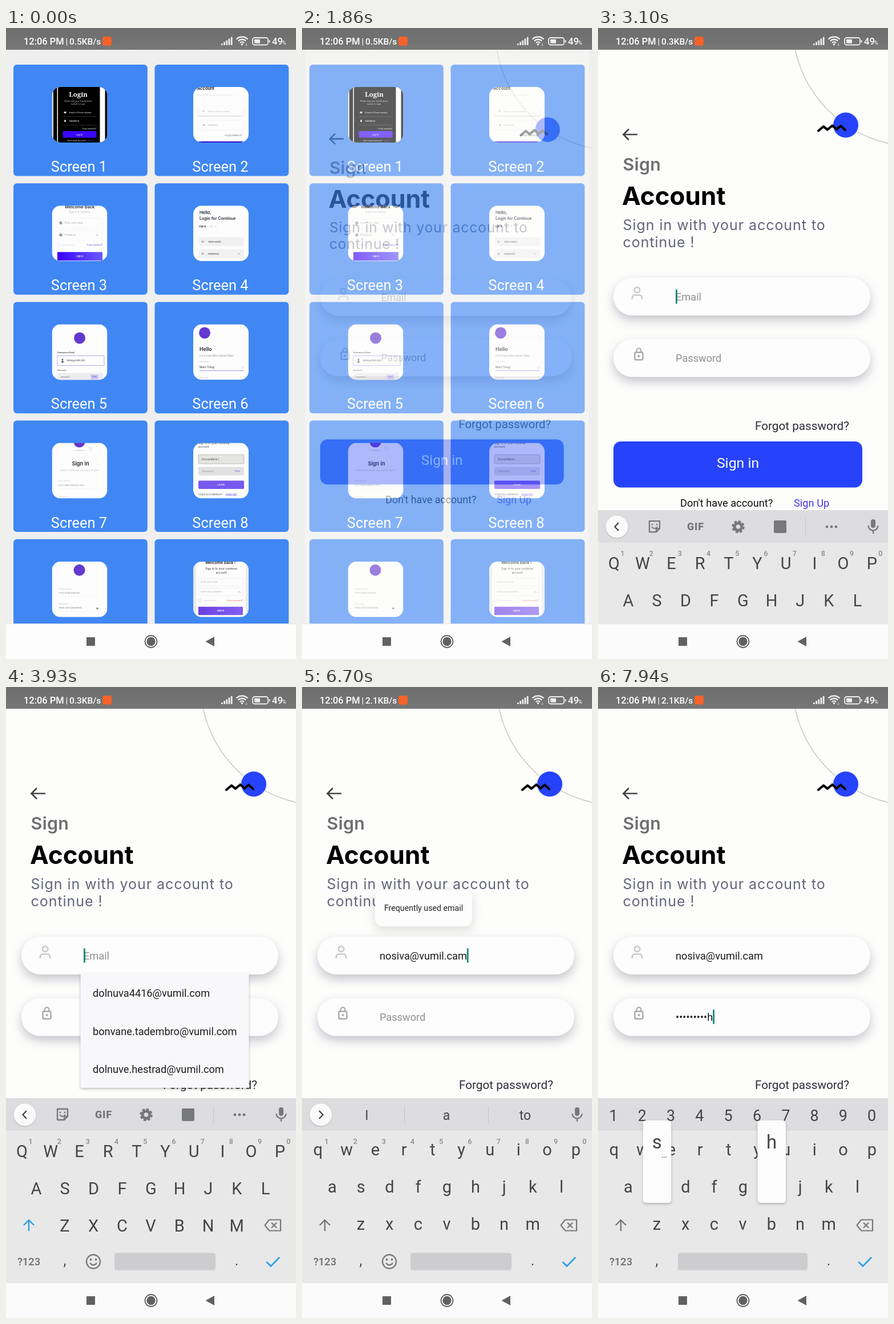
An HTML page that plays this animation: 508x1102 px, repeating every 7.99 s.

```html
<!DOCTYPE html>
<html lang="en">
<head>
<meta charset="utf-8">
<title>Sign in screen</title>
<style>
html, body { margin: 0; width: 100%; height: 100%; overflow: hidden; background: #fdfdfc; }
svg { display: block; width: 100vw; height: 100vh; font-family: Roboto, sans-serif; }
text { white-space: pre; }
.m { text-anchor: middle; }
.e { text-anchor: end; }
.md { font-weight: 500; }
.w { font-family: Inter, sans-serif; }
.b { font-family: Inter, sans-serif; font-weight: 600; }
.pill { filter: drop-shadow(0 8px 9px rgba(50, 45, 70, .27)); }
.pop { filter: drop-shadow(0 2px 2px rgba(0, 0, 0, .25)); }
.tip { filter: drop-shadow(0 5px 9px rgba(0, 0, 0, .14)); }
.soft { filter: drop-shadow(0 1px 1px rgba(0, 0, 0, .2)); }
</style>
</head>
<body>
<svg id="stage" viewBox="0 0 508 1102" preserveAspectRatio="none"></svg>
<script>
const LOOP = 7990, OPEN = 1760, FOCUS = 2900, PICK = 5690, PASS = 7020;
const KEY_TIMES = [4150, 4480, 4800, 5100];
const NAME = 'Nosi', EMAIL = 'nosiva@vumil.cam', MASH = 'sdhjsghdsh';
const MASH_START = 7140, MASH_STEP = 85, POP = 165;
const ROWS = ['qwertyuiop', 'asdfghjkl', 'zxcvbnm'], ROW_X = [28, 53, 103], STEP = 50.2;
const ROW_Y = [818, 883, 948];

const tx = (x, y, size, str, fill = '#fff', cls = '', more = '') =>
  `<text x="${x}" y="${y}" font-size="${size}" fill="${fill}" class="${cls}" ${more}>${str}</text>`;
const rc = (x, y, w, h, fill, r = 0, more = '') =>
  `<rect x="${x}" y="${y}" width="${w}" height="${h}" rx="${r}" fill="${fill}" ${more}/>`;
const ci = (x, y, r, fill, more = '') => `<circle cx="${x}" cy="${y}" r="${r}" fill="${fill}" ${more}/>`;
const ln = (d, color, w = 2, more = '') =>
  `<path d="${d}" fill="none" stroke="${color}" stroke-width="${w}" ${more}/>`;
const gp = (id, body, more = '') => `<g id="${id}" ${more}>${body}</g>`;
const round = 'stroke-linecap="round" stroke-linejoin="round"';
const edge = c => `stroke="${c}" stroke-width=".6"`;

const DARK = '#222633', PALE = '#b4b4b8', VIOLET = '#5b3de0';
const logo = (x, y) => ci(x, y, 10, '#6338cf');
const hint = (x, y, str, fill = PALE, size = 4.2, cls = 'w') => tx(x, y, size, str, fill, cls);

// Thumbnails, 97 x 97 each
const thumbs = [
  rc(0, 0, 97, 97, '#000') + rc(0, 0, 2.5, 97, '#ddd') + rc(9, 0, 1.5, 97, '#fff') + rc(84, 0, 9, 97, '#fff') +
  tx(46, 17, 11.5, 'Login', '#fff', 'm', 'font-family="Noto Serif, serif" font-weight="700"') +
  hint(46, 26, 'Please enter your email &amp; phone', '#ddd', 3.2, 'w m') + hint(46, 31, 'number to Login.', '#ddd', 3.2, 'w m') +
  rc(21, 43, 4, 3, '#ccc') + hint(30, 46, 'Email or Phone number', '#fff', 3.6) + rc(19, 51, 58, .5, '#555') +
  rc(21.5, 57.5, 3, 3.5, '#ccc') + hint(30, 61, 'Password', '#fff', 3.8) + rc(19, 66, 58, .5, '#555') +
  hint(78, 73.5, 'Forgot password?', '#fff', 3, 'w e') + rc(19, 77, 59, 11.5, '#3a08fa', 2) +
  hint(48, 84.5, 'Log in', '#fff', 4, 'w m') + hint(27, 94.5, "Don't have account?", '#fff', 3.4) + hint(62, 94.5, 'Sign Up', '#5b35ff', 3),

  tx(7, 5, 7.4, 'Account', '#111', 'b') + hint(7, 15, 'Sign in with your account to continue !', '#d2d2d5', 3.5) +
  rc(9, 34, 80, 16, '#fdfdfc', 3, 'class="soft"') + ci(18, 42, 1.3, 'none', edge('#999')) + hint(26, 43.5, 'Email or phone number', PALE, 3.5) +
  rc(9, 58, 80, 17, '#fdfdfd', 3, 'stroke="#f1f1f4"') + rc(17, 65, 3, 3, '#bbb') + hint(26, 68, 'Password', PALE, 3.7) +
  hint(86, 86, 'Forgot password?', '#777', 3.7, 'w e') + rc(9, 95, 78, 4, '#3a12cc', 1),

  tx(48.5, 5, 7.3, 'Welcome Back', DARK, 'b m') + hint(48.5, 12.5, 'Sign in to continue', PALE, 4.2, 'w m') +
  [22, 43].map((y, i) => rc(9.5, y, 79, 17, '#fdfdfd', 2, edge('#eeeef1')) + rc(13, y + 6, 5, 4.5, '#999') +
    hint(22, y + 10, i ? 'Password' : 'Enter your email', '#aaa', 4.2)).join('') +
  ln('M77 49l4 4M77 52q2-3 4 0', '#aaa', .6) + rc(9.5, 66, 5, 5, 'none', .5, edge('#ddd')) +
  hint(18, 70, 'Remember me', '#ccc', 3.2) + hint(88.5, 70, 'Forgot password?', VIOLET, 3.2, 'w e') +
  rc(9.5, 81, 79, 15, 'url(#btn)', 1) + hint(49, 90, 'Sign In', '#fff', 3.7, 'b m'),

  tx(11, 15, 7.4, 'Hello,', DARK, 'b') + tx(11, 24.5, 7.1, 'Login for Continue', DARK, 'b') +
  hint(10, 38, 'Sign in', DARK, 3.8, 'b') + hint(25, 38, '/ Sign up', '#c5c5c9', 3.8) +
  [55, 76].map((y, i) => rc(10, y, 79, 15.5, '#f1f1f2', 2) + ci(16.5, y + 8, 2, '#b5b5b9') +
    hint(26, y + 9.5, i ? 'Password' : 'Tarvo Menil', '#333', 4.1)).join('') + ln('M78 82l4 4M78 85q2-3 4 0', '#aaa', .6),

  logo(48.5, 24) + hint(9.5, 51, 'Username or Email', '#333', 3.3, 'b') +
  rc(9.5, 55, 82, 17, '#fdfdff', 1, edge('#7d73e8')) + ci(18.5, 61.5, 1.5, '#666') + ci(18.5, 65.5, 2, '#666') +
  hint(26, 64.5, 'tavolu@vumil.com', '#333', 3.7) + hint(9.5, 81.5, 'Password', '#333', 3.3) +
  rc(9.5, 85, 80, 13, '#ececee', 1) + hint(15, 93.5, '•••••••', '#222', 4) + rc(68, 88, 13, 8, '#c9c4f4', 1) + hint(74.5, 93, 'View', '#4636c8', 3, 'w m'),

  logo(20, 15) + tx(11, 47, 8.8, 'Hello', DARK, 'b') + hint(11, 57, "Let's Learn More About Plants", '#888', 4.2) +
  hint(11, 67, 'Username', PALE, 3.3) + hint(11, 77, 'Marn Tolug', DARK, 4.8) + ln('M84 75l2 2 3-4', '#7c9', .7) +
  rc(11, 80.5, 78, .7, '#7766dd') + hint(11, 95, 'Password', PALE, 3.3),

  logo(48, -2) + `<ellipse cx="48" cy="13" rx="12" ry="1" fill="#ddd"/>` + ln('M64 7l7 2-4 5z', '#ccc', .6) +
  tx(50, 39, 9.2, 'Sign in', DARK, 'b m') + hint(48.5, 49, 'Enter to username and explore within', '#c2c2c6', 3.9, 'w m') +
  hint(11, 67, 'Email address', '#ccc', 3.3) + hint(11, 75.5, 'Your email address here', '#999', 4) + rc(11, 80, 77, .5, '#eee') +
  hint(11, 95, 'Password', '#ccc', 3.3),

  hint(9, 2, 'Sign in to your continue', '#444', 4.9) + hint(9, 8.5, 'account', '#444', 4.9) +
  rc(9, 20.5, 80, 16, '#e6e6e1', 2, edge('#999')) + hint(15, 30, 'DorvanMelst |', '#444', 4.6) +
  rc(9, 42, 80, 15, '#e1e1e2', 3) + hint(15, 51, 'Password', '#999', 4.4) + hint(82, 50, 'Verify', VIOLET, 3.3, 'w e') +
  rc(9, 66, 80, 14.5, '#7659ef', 2) + hint(48.5, 74.5, 'LOGIN', '#fff', 4, 'b m') +
  hint(9, 91, 'Forgot your password?', '#555', 3.9) + hint(57, 91, 'Reset here', VIOLET, 3.9, 'w', 0) + rc(57, 92, 20, .4, VIOLET),

  logo(48, 15) + hint(12, 49.5, 'Email Address', '#bbb', 3.5) + hint(12, 56.5, 'Your email address', '#999', 4.1) + rc(12, 61, 70, .5, '#eee') +
  hint(12, 75.5, 'Password', '#bbb', 3.5) + hint(12, 82.5, 'Enter your password', '#888', 4.1) + rc(12, 87, 70, .5, '#eee') +
  ci(79.5, 82, 1.8, '#888'),

  rc(0, 0, 5, 97, '#e9e9eb') + rc(92, 0, 5, 97, '#e9e9eb') + tx(47.5, 4, 6.9, 'Welcome Back !', '#111', 'b m') +
  hint(49, 14, 'Sign in to your continue', '#333', 5, 'w m') + hint(49, 21, 'account', '#333', 5, 'w m') +
  [29.5, 46.5].map((y, i) => rc(9, y, 78, 13, '#fdfdfd', 1, edge('#e2e2e5')) +
    hint(13, y + 8, i ? 'Enter your password' : 'Enter your email', PALE, 3.9)).join('') +
  ln('M79 51l4 4M79 54q2-3 4 0', '#aaa', .6) + rc(9, 65, 5, 5, 'none', .5, edge('#ccc')) +
  hint(18, 69, 'Remember me', '#ccc', 3.3) + hint(86.5, 69, 'Forgot password?', '#e8603c', 3.3, 'w e') +
  rc(9, 79, 78, 14.5, 'url(#btn2)', 1) + hint(48, 87.5, 'Sign In', '#fff', 3.9, 'b m')
];

const cards = thumbs.map((body, i) => {
  const x = i % 2 ? 260.5 : 13, y = 64 + 207.2 * (i >> 1);
  return rc(x, y, 234.8, 194.5, '#4087f4', 6) +
    `<g transform="translate(${x + 67.5} ${y + 39})" clip-path="url(#thumb)">${rc(0, 0, 97, 97, '#fdfdfd')}${body}</g>` +
    tx(x + 115, y + 187, 25.4, 'Screen ' + (i + 1), '#fff', 'm');
}).join('');

const login = rc(0, 0, 508, 1102, '#fdfdfc') +
  ci(555, -8, 214.6, 'none', 'stroke="#cbcbc8" stroke-width="1.7"') + ci(434, 169.5, 22, '#2643fb') +
  ln('M386 179.5L395 172L402 177.5L410.500 170.500L418 177L425 171L433 178', '#000', 4.2, round) +
  ln('M69 186H45M54 176.500L44.500 186L54 195.500', '#454545', 2.7) +
  tx(43.5, 249, 30.5, 'Sign', '#706f70', 'b', 'letter-spacing=".3"') +
  tx(42, 308.5, 44, 'Account', '#000', 'w', 'font-weight="700"') +
  tx(43.5, 352.5, 25, 'Sign in with your account to', '#64657a', 'w', 'letter-spacing=".95"') +
  tx(43.5, 382.5, 25, 'continue !', '#64657a', 'w', 'letter-spacing=".95"') +
  rc(27, 436, 450, 66, '#fdfdfd', 33, 'class="pill"') + rc(27, 543.5, 450, 66, '#fdfdfd', 33, 'class="pill"') +
  ci(68.5, 457.5, 4.7, 'none', 'stroke="#cacac8" stroke-width="2.7"') +
  ln('M60 474V472Q60 466.500 65 466.500H72Q77 466.500 77 472V474', '#cacac8', 2.7) +
  rc(64.5, 566.5, 14, 13, 'none', 2, 'stroke="#a9a9ab" stroke-width="2.4"') + ci(71.500, 573, 2, '#a9a9ab') +
  ln('M67.500 566V563.500A4 4 0 0 1 75.500 563.500V566', '#a9a9ab', 2.2) +
  tx(136, 475.5, 18.2, 'Email', '#8f8f90', '', 'id="mail"') + rc(136, 477.6, 36, 1.3, '#222', 0, 'id="under"') +
  tx(136, 582.8, 18.2, 'Password', '#8f8f90', '', 'id="pass"') +
  tx(275, 702, 20.7, 'Forgot password?', '#2c2d35') +
  rc(27, 722, 436, 80.5, '#2643fb', 13) + tx(245, 768, 24.8, 'Sign in', '#fff', 'm') +
  tx(144, 836, 18.3, "Don't have account?", '#111') + tx(343, 836, 18.3, 'Sign Up', '#4038ea') +
  tx(69, 518, 18.4, "* Please include an '@' in the email address.", '#d0090f', '', 'id="error"') +
  gp('menu', rc(130.5, 500, 295, 200, '#f8f8fa', 2, 'class="pop"') +
    ['dolnuva4416@vumil.com', 'bonvane.tadembro@vumil.com', 'dolnuve.hestrad@vumil.com']
      .map((s, i) => tx(152, 541 + 66.5 * i, 18.2, s, '#1d1d1f')).join('')) +
  rc(0, 457, 2.7, 25, '#0c8577', 0, 'id="caret"') +
  gp('tip', rc(128, 355, 170, 63, '#fdfdfd', 13, 'class="tip"') + tx(213, 391, 14.2, 'Frequently used email', '#222', 'm'));

// Keyboard
const INK = '#444547', GREY = '#77787a', BLUE = '#2d9fe3';
const keyX = (row, i) => ROW_X[row] + STEP * i;
const letters = up => ROWS.map((row, r) => [...row].map((c, i) =>
  tx(keyX(r, i), ROW_Y[r] + (up ? 3 : 0), 29, up ? c.toUpperCase() : c, INK, 'm')).join('')).join('') +
  ln('M40 950V932M31 940L40 931L49 940', up ? BLUE : GREY, 2.4);
const digits = f => [...'1234567890'].map(f).join('');
const knob = ci(33, 747, 19.5, '#fafafa', 'class="soft"');
const mic = rc(478, 734, 8, 15, GREY, 4) + ln('M473.500 745A8.500 8.500 0 0 0 490.500 745M482 753V759', GREY, 2.3);
const bar = x => rc(x, 732, 1, 30, '#c4c4c6');

const board = rc(0, 718, 508, 323, '#e8e8e9') + rc(0, 718, 508, 57, '#dddddf') +
  gp('tools', knob + ln('M36 740L29.500 747L36 754', INK, 2.3) +
    ln('M90 737H108V750L102 756H90ZM108 750H102V756', GREY, 2.3, round) + ci(95, 743, 1.4, GREY) + ci(103, 743, 1.4, GREY) +
    ln('M94 747Q99 753 104 747', GREY, 2) + tx(171, 752.5, 18, 'GIF', GREY, 'm', 'font-weight="800" letter-spacing=".8"') +
    ci(245.500, 747, 6.3, 'none', `stroke="${GREY}" stroke-width="5"`) +
    ci(245.500, 747, 9.700, 'none', `stroke="${GREY}" stroke-width="3" stroke-dasharray="4.6 3.02"`) +
    rc(308, 736, 22, 22, GREY, 2) + bar(363) + [401, 409, 417].map(x => ci(x, 747, 2.4, GREY)).join('') + mic) +
  gp('words', knob + ln('M30 740L36.500 747L30 754', INK, 2.3) + bar(179) + bar(326) + mic +
    tx(113.5, 756, 23, '', INK, 'm', 'id="left"') + tx(253, 756, 23, 'a', INK, 'm', 'id="mid"') +
    tx(391, 756, 23, '', INK, 'm', 'id="right"') +
    gp('guess', tx(252.5, 737, 18, EMAIL.split('@')[0], INK, 'm md') + tx(252.5, 759, 16, '@' + EMAIL.split('@')[1], INK, 'm'))) +
  gp('nums', digits((d, i) => tx(27 + 50.3 * i, 757.5, 27, d, INK, 'm'))) +
  gp('small', digits((d, i) => tx(43 + 50.2 * i, 797.5, 12.5, d, '#8a8a8c', 'm md'))) +
  gp('upper', letters(true)) + gp('lower', letters(false)) +
  ln('M461 930.500H481V949.500H461L453.500 940ZM465 935.500L474 944.500M474 935.500L465 944.500', GREY, 2.2) +
  tx(40, 1010, 18.3, '?123', '#6b6c6e', 'm md') + tx(103, 1010, 25, ',', INK, 'm') + tx(404, 1010, 25, '.', INK, 'm') +
  rc(190, 988.5, 177, 30, '#cdcdcf', 4, 'id="space"') +
  gp('smile', ci(153, 1003.5, 12, 'none', `stroke="${GREY}" stroke-width="2.4"`) + ci(148.500, 1000, 1.9, GREY) +
    ci(157.500, 1000, 1.9, GREY) + ln('M147 1006Q153 1013 159 1006', GREY, 2.3)) +
  ln('M456.500 1004L464 1011.500L479 996', BLUE, 2.7) + gp('pops', '');

const status = rc(0, 0, 508, 38, 'url(#bar)') + tx(31, 29, 16.4, '12:06 PM', '#fff', 'md') + tx(104.5, 28.5, 15.5, '|') +
  tx(111, 29, 15.4, '', '#fff', 'md', 'id="speed"') + rc(169, 15, 16, 16, '#f4622a', 4) +
  [0, 1, 2, 3, 4].map(i => rc(377 + 4.2 * i, 27 - 2.8 * i, 2.8, 3 + 2.8 * i, '#eee', 1)).join('') +
  [14, 9.5, 5].map(r => { const k = r * .707;
    return ln(`M${413.5 - k} ${29.5 - k}A${r} ${r} 0 0 1 ${413.5 + k} ${29.5 - k}`, '#eee', 2.3); }).join('') +
  ci(413.5, 28.5, 1.8, '#eee') + ln('M421 26V31M419.500 29.500L421 31L422.500 29.500', '#ddd', .8) +
  rc(432, 17, 27, 12.5, 'none', 3.5, 'stroke="#eee" stroke-width="1.8"') + rc(435, 19.800, 10, 7, '#eee', 1) + rc(460.5, 21, 2, 4.5, '#eee', 1) +
  tx(466, 29, 16.6, '49', '#fff', 'md') + tx(484, 29, 9, '%', '#fff', 'md');

const nav = rc(0, 1040, 508, 62, '#fdfdfd', 0, 'id="nav"') + rc(0, 1040, 508, 1.2, '#e6e6e6') +
  rc(141, 1064, 15, 15, '#616161') + ci(254, 1071.5, 10.500, 'none', 'stroke="#616161" stroke-width="1.8"') +
  ci(254, 1071.5, 7.7, '#616161') + '<path d="M349.500 1071.500L365 1063V1080Z" fill="#616161"/>';

const grad = (id, a, b, v) => `<linearGradient id="${id}" x1="0" y1="0" x2="${v ? 0 : 1}" y2="${v ? 1 : 0}">` +
  `<stop stop-color="${a}"/><stop offset="1" stop-color="${b}"/></linearGradient>`;

document.getElementById('stage').innerHTML =
  `<defs><clipPath id="thumb">${rc(0, 0, 97, 97, '#000', 15)}</clipPath>` +
  grad('btn', '#3a02f8', '#6a5bff') + grad('btn2', '#6a3fe0', '#8360f2') + grad('bar', '#6d6d6d', '#777', 1) + '</defs>' +
  rc(0, 0, 508, 1102, '#efefef') + cards + gp('login', login) + gp('board', board) + nav + status;

const el = {};
document.querySelectorAll('#stage [id]').forEach(n => el[n.id] = n);
const show = (id, on) => el[id].style.display = on ? '' : 'none';
const say = (id, s) => { if (el[id].textContent !== s) el[id].textContent = s; };
const attr = (id, o) => { for (const k in o) el[id].setAttribute(k, o[k]); };
const prog = (t, from, len) => Math.min(1, Math.max(0, (t - from) / len));
const out = p => 1 - (1 - p) ** 3;

function bubble(key) {
  const c = key.toLowerCase(), r = ROWS.findIndex(s => s.includes(c));
  const x = keyX(r, ROWS[r].indexOf(c)), y = ROW_Y[r] - 126;
  return rc(x - 24.5, y, 49.5, 144, '#fcfcfc', 5, 'class="pop"') + tx(x, y + 49, 33, key, INK, 'm') +
    ('hjdg'.includes(c) ? '' : tx(x + 12.5, y + 65, 15, '…', INK, 'm'));
}

function draw(t) {
  const open = prog(t, OPEN, 280);
  show('login', open > 0);
  const k = .92 + .08 * out(open);
  attr('login', { opacity: open, transform: `translate(${254 * (1 - k)} ${551 * (1 - k)}) scale(${k})` });
  say('speed', (t < 2000 ? '0.5' : t < 6000 ? '0.3' : '2.1') + 'KB/s');

  const rise = out(prog(t, FOCUS + 130, 260));
  show('board', rise > 0);
  attr('board', { transform: `translate(0 ${323 * (1 - rise)})` });
  attr('nav', { fill: rise > .5 ? '#fbfbfb' : '#fdfdfd' });

  const n = KEY_TIMES.filter(s => s <= t).length;
  const picked = t >= PICK, secret = t >= PASS;
  const typed = picked ? EMAIL : NAME.slice(0, n);
  const m = Math.max(0, Math.min(MASH.length, Math.floor((t - MASH_START) / MASH_STEP) + 1));
  say('mail', typed || 'Email');
  attr('mail', { fill: typed ? '#1b1b1d' : '#8f8f90' });
  say('pass', m ? '•'.repeat(m - 1) + MASH[m - 1] : 'Password');
  attr('pass', { fill: m ? '#1b1b1d' : '#8f8f90' });

  const mailW = typed ? el.mail.getComputedTextLength() : 0;
  show('under', n > 0 && !picked);
  attr('under', { width: mailW });
  show('error', n > 0 && !picked);

  const menu = n ? 0 : prog(t, FOCUS + 420, 150);
  show('menu', menu > 0);
  attr('menu', { opacity: menu });
  const tip = prog(t, PICK + 260, 150) * (1 - prog(t, PASS - 60, 60));
  show('tip', tip > 0);
  attr('tip', { opacity: tip });

  const last = m ? MASH_START + (m - 1) * MASH_STEP : secret ? PASS : picked ? PICK : n ? KEY_TIMES[n - 1] : FOCUS;
  show('caret', t >= FOCUS && (t - last) % 1000 < 500);
  attr('caret', { x: 136 + (secret ? (m ? el.pass.getComputedTextLength() : 0) : mailW), y: secret ? 563.5 : 456.5 });

  show('tools', !n);
  show('words', n > 0 && !secret);
  show('nums', secret);
  show('small', !secret);
  show('upper', !n);
  show('lower', n > 0);
  show('smile', !secret);
  attr('space', secret ? { x: 140, width: 227 } : { x: 190, width: 177 });
  say('left', picked ? 'I' : typed);
  say('right', picked ? 'to' : 'L' + typed.slice(1));
  show('mid', picked);
  show('guess', !picked);

  const live = s => t >= s && t < s + POP;
  el.pops.innerHTML = KEY_TIMES.map((s, i) => live(s) ? bubble(NAME[i]) : '').join('') +
    [...MASH].map((c, i) => live(MASH_START + i * MASH_STEP) ? bubble(c) : '').join('');
}

function tick() {
  draw(performance.now() % LOOP);
  requestAnimationFrame(tick);
}
tick();
</script>
</body>
</html>
```
